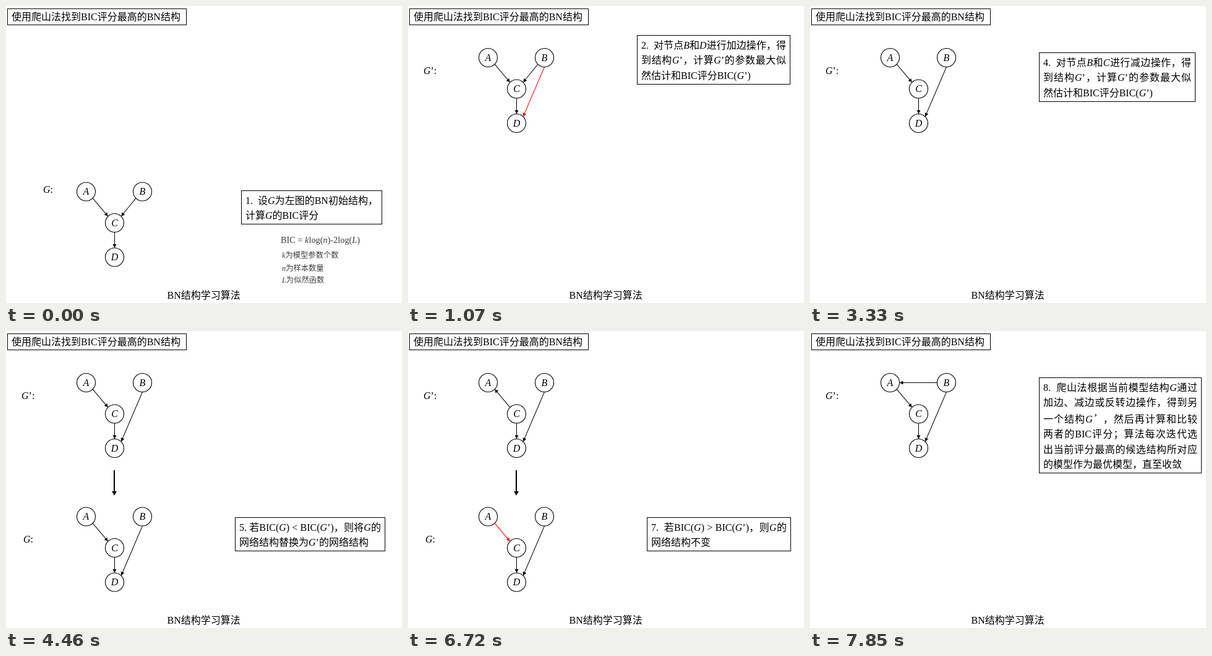
These frames come from a looping animation (640x480 px, 8.98 s). An HTML page with a canvas:

```html
<!DOCTYPE html>
<html lang="zh-CN">
<head>
<meta charset="utf-8">
<title>BN结构学习算法</title>
<style>
  html, body { margin: 0; width: 100%; height: 100%; overflow: hidden; background: #fff; }
  #stage {
    position: relative; width: 640px; height: 480px; overflow: hidden; color: #000;
    font: 16px/25px "Liberation Serif", "Noto Sans CJK SC", "Noto Sans CJK", serif;
    text-autospace: no-autospace; text-spacing-trim: space-all;
  }
  canvas, .text, .box { position: absolute; }
  canvas { left: 0; top: 0; }
  .text, .box { white-space: nowrap; }
  .box { box-sizing: border-box; border: 1px solid #000; padding: 3.5px 6px 0; line-height: 24.5px; }
  .box div { text-align: justify; text-align-last: justify; }
  .box div:last-child { text-align-last: left; }
  #title { padding-top: 0.5px; }
  .wide { font-family: "Noto Sans CJK SC", "Noto Sans CJK", sans-serif; font-style: italic; }
</style>
</head>
<body>
<div id="stage">
  <canvas id="view" width="640" height="480"></canvas>
  <div id="layer"></div>
</div>
<script>
const ctx = document.getElementById('view').getContext('2d');
const layer = document.getElementById('layer');
const LOOP = 8980, R = 15, DIAG = R * Math.SQRT1_2, DROP = 216.5;
const RED = '#f00', BLACK = '#000', GRAY = '#3c3c3c';

const NODES = { A: [129.5, 83.5], B: [220.5, 83.5], C: [175.5, 134], D: [175.5, 189.5] };
// Edge: the directions in which it leaves and meets the circles
const EDGES = {
  AC: [[1, 1], [-1, -1]],
  CA: [[-1, -1], [1, 1]],
  BC: [[-1, 1], [1, -1]],
  CD: [[0, 1], [0, -1]],
  BD: [[0, 1], [1, -1]],
  BA: [[-1, 0], [1, 0]]
};

const evaluate = ['到结构*G*’，计算*G*’的参数最大似', '然估计和BIC评分BIC(*G*’)'];
const replace = n => [n + '. 若BIC(*G*) &lt; BIC(*G*’)，则将*G*的', '网络结构替换为*G*’的网络结构'];

// An exclamation mark paints the edge red
const STEPS = [
  { at: 0, low: 'AC BC CD', box: [380, 298, 228, 55], notes: true,
    lines: ['1.__设*G*为左图的BN初始结构，', '计算*G*的BIC评分'] },
  { at: 1070, top: 'AC BC CD BD!', box: [370, 47, 248, 80],
    lines: ['2.__对节点*B*和*D*进行加边操作，得', ...evaluate] },
  { at: 2200, top: 'AC BC CD BD', low: 'AC BC CD BD!', box: [370, 301, 243, 55], lines: replace(3) },
  { at: 3330, top: 'AC CD BD', box: [370, 75, 253, 80],
    lines: ['4.__对节点*B*和*C*进行减边操作，得', ...evaluate] },
  { at: 4460, top: 'AC CD BD', low: 'AC CD BD', box: [370, 301, 243, 55], lines: replace(5) },
  { at: 5590, top: 'CA! CD BD', box: [370, 75, 253, 80],
    lines: ['6.__对节点*A*和*C*进行反转边操作，', '得到结构*G*’，计算*G*’的参数最大',
      '似然估计和BIC评分BIC(*G*’)'] },
  { at: 6720, top: 'CA CD BD', low: 'AC! CD BD', box: [386, 301, 233, 55],
    lines: ['7.__若BIC(*G*) &gt; BIC(*G*’)，则*G*的', '网络结构不变'] },
  { at: 7850, top: 'BA AC CD BD', box: [370, 75, 263, 155],
    lines: ['8.__爬山法根据当前模型结构*G*通过', '加边、减边或反转边操作，得到另',
      '一个结构*G*<span class="wide">’</span>，然后再计算和比较', '两者的BIC评分；算法每次迭代选',
      '出当前评分最高的候选结构所对应', '的模型作为最优模型，直至收敛'] }
];

const markup = s => s.replace(/\*(\w)\*/g, '<i>$1</i>').replace(/_/g, '&nbsp;');

function label(s, x, baseline, size = 16, color = BLACK) {
  const top = baseline - 12.5 - size * 0.338;
  return `<div class="text" style="left:${x}px;top:${Math.round(top)}px;font-size:${size}px;color:${color}">${markup(s)}</div>`;
}

function box([x, y, w, h], lines, id = '') {
  const rows = lines.map(s => `<div>${markup(s)}</div>`).join('');
  return `<div class="box" id="${id}" style="left:${x}px;top:${y}px;width:${w}px;height:${h}px">${rows}</div>`;
}

function arrow(x0, y0, x1, y1, color, width = 1, head = 6, half = 3) {
  const len = Math.hypot(x1 - x0, y1 - y0);
  ctx.save();
  ctx.translate(x0, y0);
  ctx.rotate(Math.atan2(y1 - y0, x1 - x0));
  ctx.strokeStyle = ctx.fillStyle = color;
  ctx.lineWidth = width;
  ctx.beginPath();
  ctx.moveTo(0, 0);
  ctx.lineTo(len - head + 1, 0);
  ctx.stroke();
  ctx.beginPath();
  ctx.moveTo(len, 0);
  ctx.lineTo(len - head, -half);
  ctx.lineTo(len - head, half);
  ctx.fill();
  ctx.restore();
}

function rim(name, [dx, dy], drop) {
  const r = dx && dy ? DIAG : R;
  return [NODES[name][0] + dx * r, NODES[name][1] + dy * r + drop];
}

function graph(edges, drop) {
  ctx.font = 'italic 16px "Liberation Serif", serif';
  ctx.textAlign = 'center';
  ctx.fillStyle = ctx.strokeStyle = BLACK;
  ctx.lineWidth = 1.1;
  for (const [name, [x, y]] of Object.entries(NODES)) {
    ctx.beginPath();
    ctx.arc(x, y + drop, R, 0, 2 * Math.PI);
    ctx.stroke();
    ctx.fillText(name, x, Math.round(y + drop + 5));
  }
  for (const edge of edges.split(' ')) {
    const [from, to, mark] = edge;
    const [out, into] = EDGES[from + to];
    arrow(...rim(from, out, drop), ...rim(to, into, drop), mark ? RED : BLACK);
  }
}

function show(step) {
  let html = box([2, 4, 290, 27], ['使用爬山法找到BIC评分最高的BN结构'], 'title')
    + label('BN结构学习算法', 260.5, 473) + box(step.box, step.lines);
  ctx.clearRect(0, 0, 640, 480);
  if (step.top) {
    graph(step.top, 0);
    html += label('*G*’:', 25, 110);
  }
  if (step.low) {
    graph(step.low, DROP);
    html += step.top ? label('*G*:', 28, 342) : label('*G*:', 60, 302);
  }
  if (step.top && step.low) arrow(175, 225, 175, 266, BLACK, 2, 7, 4);
  if (step.notes) {
    html += label('BIC = *k*log(*n*)-2log(*L*)', 444, 383, 14.3, GRAY)
      + label('*k*为模型参数个数', 446, 408, 12.3, GRAY)
      + label('*n*为样本数量', 446, 429, 12.3, GRAY)
      + label('*L*为似然函数', 446, 448, 12.3, GRAY);
  }
  layer.innerHTML = html;
}

let shown;
const start = performance.now();

function tick() {
  const t = (performance.now() - start) % LOOP;
  const step = STEPS.findLast(s => t >= s.at);
  if (step !== shown) show(shown = step);
  requestAnimationFrame(tick);
}
tick();
</script>
</body>
</html>
```
